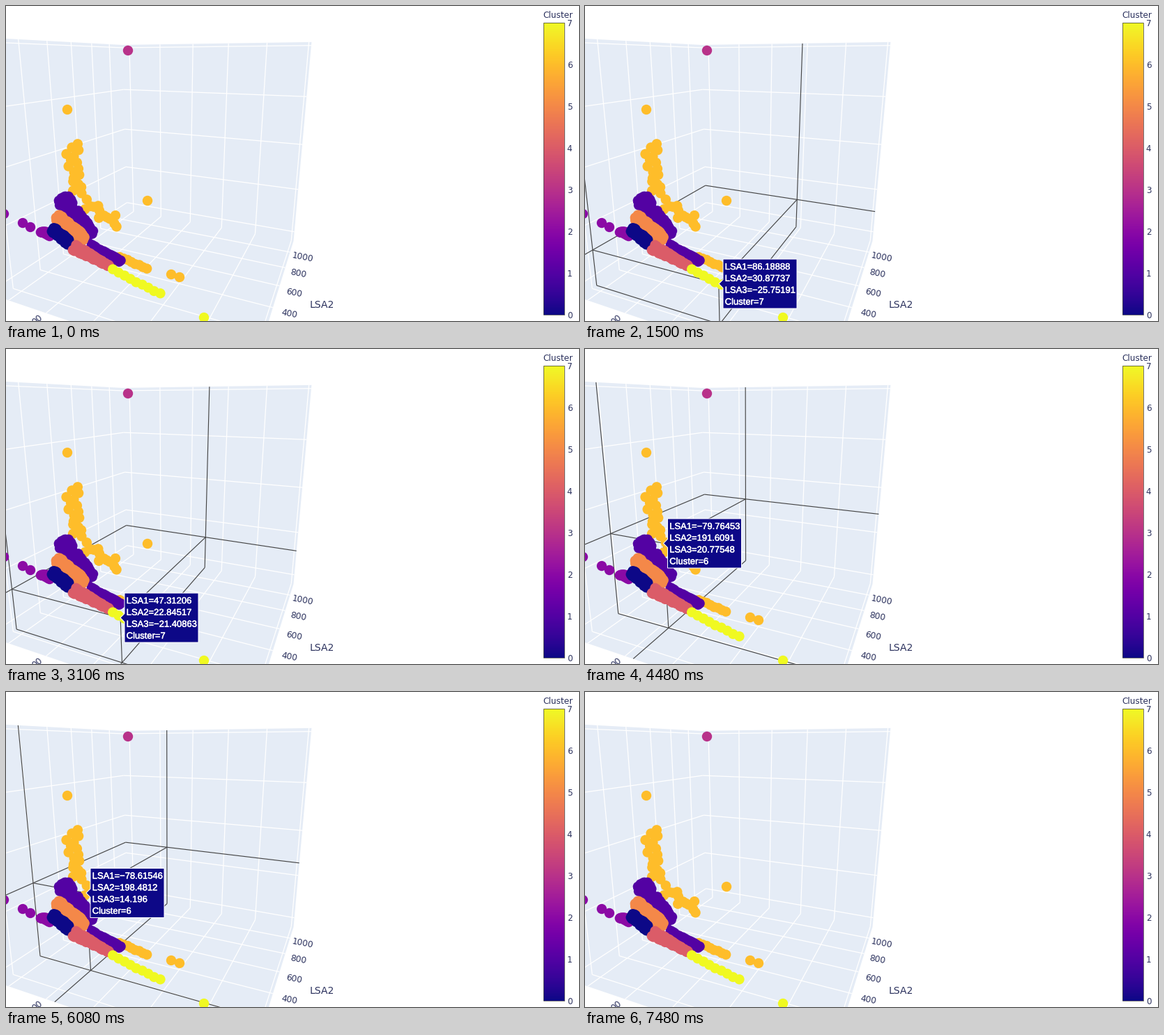
Write a matplotlib script that moves like this. It is 822x453 px and loops after 8 s.

```python
import numpy as np
import matplotlib.pyplot as plt
from matplotlib.animation import FuncAnimation
from matplotlib.collections import LineCollection
from matplotlib.patches import Polygon, Rectangle
from matplotlib.patheffects import withStroke

W, H, DPI = 822, 453, 128
PX = 72 / DPI  # points per pixel
INK = "#2c325e"
plasma = plt.get_cmap("plasma")
rng = np.random.default_rng(4)

fig = plt.figure(figsize=(W / DPI, H / DPI), dpi=DPI, facecolor="white")
ax = fig.add_axes([0, 0, 1, 1])
ax.axis("off")

# Perspective camera, anchored at the far top corner of the data box
LOW = np.array([-224, -85, -61.2])
HIGH = np.array([306, 1166, 153.2])
CORNER = np.array([LOW[0], HIGH[1], HIGH[2]])
ORIGIN = np.array([166.8, 56])
AXES = np.array([(35.85, -2.6), (16.01, 2.39), (-12.83, -127.1)]) / 100
DEPTH = np.array([-0.0351, 0.0324, -0.0549]) / 100
WALLS = (LOW[0], HIGH[1], LOW[2])


def project(point):
    offset = np.asarray(point, float) - CORNER
    return (ORIGIN + offset @ AXES) / (1 + offset @ DEPTH)


def box_line(axis, point):
    """Line along one axis through a point, across the whole box."""
    ends = np.array([point, point], float)
    ends[:, axis] = LOW[axis], HIGH[axis]
    return project(ends[0]), project(ends[1])


def on_wall(axis, point):
    hit = np.array(point, float)
    hit[axis] = WALLS[axis]
    return hit


def wall_lines(axis, value):
    """Lines of one constant coordinate on the two walls that show it."""
    point = np.array(WALLS, float)
    point[axis] = value
    return [box_line(other, point) for other in range(3) if other != axis]


def label(x, y, text, size, **kw):
    kw = {"color": INK, "family": "DejaVu Sans", "ha": "center",
          "va": "center_baseline", **kw}
    return ax.text(x, y, text, fontsize=size * PX, **kw)


# Walls, floor and grid
x0, y0, z0 = LOW
x1, y1, z1 = HIGH
outline = [(x0, y0, z1), (x0, y1, z1), (x1, y1, z1),
           (x1, y1, z0), (x1, y0, z0), (x0, y0, z0)]
pane = Polygon([project(c) for c in outline], facecolor="#E5ECF6", lw=0, zorder=0)
ax.add_patch(pane)
grid = [line for axis, step in enumerate((100, 200, 50))
        for value in np.arange(-200, 1001, step) if LOW[axis] < value < HIGH[axis]
        for line in wall_lines(axis, value)]
ax.add_collection(LineCollection(grid, colors="white", linewidths=1.3 * PX, zorder=1))
spikes = LineCollection([], colors="#444444", linewidths=1.15 * PX, zorder=2)
ax.add_collection(spikes)


# Data points, drawn back to front
def band(a, b, count, start, end=None):
    """Points along a line, scattered sideways by a width that may taper."""
    a, b = np.array(a, float), np.array(b, float)
    t = np.linspace(0, 1, count)
    width = start + ((start if end is None else end) - start) * t
    side = np.array([b[1] - a[1], a[0] - b[0]]) / np.hypot(*(b - a))
    return a + np.outer(t, b - a) + np.outer(width * rng.uniform(-1, 1, count), side)


layers = [
    (3, [(175, 64)]),
    (6, [(88, 149), (203, 280), (237, 386), (249, 390)]),
    (6, band((94, 199), (99, 270), 17, 10)),
    (6, band((112, 285), (161, 313), 13, 9)),
    (6, band((163, 361), (202, 378), 8, 1)),
    (1, band((80, 276), (122, 329), 140, 10, 6)),
    (1, band((122, 345), (164, 367), 40, 2)),
    (2, [(-3, 299), (24, 312), (35, 318)]),
    (2, band((50, 325), (64, 329), 20, 1, 4)),
    (5, band((73, 303), (112, 335), 90, 5)),
    (0, band((67, 321), (91, 341), 60, 4)),
    (4, band((98, 347), (148, 374), 90, 5, 1)),
    (7, band((153, 379), (221, 414), 9, 1)),
    (7, [(284, 448)]),
]
points = np.vstack([spots for _, spots in layers])
shades = np.vstack([[plasma(c / 7)] * len(spots) for c, spots in layers])
ax.scatter(*points.T, s=(14.4 * PX) ** 2, c=shades, linewidths=0, zorder=3)

# Axis labels
for tick in (400, 600, 800, 1000):
    x, y = project((x1, tick, z0))
    far = (1000 - tick) / 600
    label(426 - 20 * far ** 1.05, 361.5 + 81 * far ** 1.15, str(tick), 12.3,
          rotation=-11, va="center")
label(44.5, 451, "00", 12.3, rotation=40, va="center")
label(453, 429, "LSA2", 14)

# Colour bar
ax.imshow(np.linspace(1, 0, 256)[:, None], cmap=plasma, aspect="auto",
          extent=(771, 801, 444, 24), zorder=4)
ax.add_patch(Rectangle((771, 24), 30, 420, fill=False, ec="#444444",
                       lw=PX, alpha=0.75, zorder=5))
label(792, 12, "Cluster", 12)
for i in range(8):
    label(808.5, 444 - 60 * i, str(i), 12)
ax.set_xlim(0, W)
ax.set_ylim(H, 0)

# Hover box
tip = Polygon([(0, 0)] * 3, facecolor=plasma(0), edgecolor="white", lw=PX, zorder=6)
ax.add_patch(tip)
tip_rows = [label(0, 0, "", 13, color="white", family="Liberation Sans",
                  ha="left", va="baseline", zorder=7,
                  path_effects=[withStroke(linewidth=0.4 * PX, foreground="white")])
            for _ in range(4)]

# Start in ms, hovered position, cluster
HOVERS = [
    (500, (111.7682, 41.29835, -29.52941), 7),
    (1500, (86.18888, 30.87737, -25.75191), 7),
    (2500, (47.31206, 22.84517, -21.40863), 7),
    (3500, (-50.09478, 91.36556, 1.763514), 1),
    (4480, (-79.76453, 191.6091, 20.77548), 6),
    (5480, (-78.61546, 198.4812, 14.196), 6),
    (6480, (-79.10382, 194.2067, 14.63352), 6),
]
HOVER_END = 7480
STEP = 20
FRAMES = 8000 // STEP


def show_hover(position, cluster):
    target = project(position)
    lines = [line for axis in range(3) for line in wall_lines(axis, position[axis])]
    lines += [(target, project(on_wall(axis, position))) for axis in range(3)]
    spikes.set_segments(lines)

    x, y = np.round(target * 2) / 2
    near, far, half = x + 6, x + 112, 35.5
    tip.set_xy([(x, y), (near, y - 6), (near, y - half), (far, y - half),
                (far, y + half), (near, y + half), (near, y + 6)])
    texts = [f"LSA{i}={v:.7g}" for i, v in enumerate(position, 1)]
    texts.append(f"Cluster={cluster}")
    for i, (row, text) in enumerate(zip(tip_rows, texts)):
        row.set_text(text.replace("-", "\u2212"))
        row.set_position((x + 8.7, y - 20.5 + 16.8 * i))


def update(frame):
    t = frame * STEP
    visible = HOVERS[0][0] <= t < HOVER_END
    for artist in (spikes, tip, *tip_rows):
        artist.set_visible(visible)
    if visible:
        _, position, cluster = [h for h in HOVERS if h[0] <= t][-1]
        show_hover(position, cluster)
    return [spikes, tip, *tip_rows]


spikes.set_clip_path(pane)
anim = FuncAnimation(fig, update, frames=FRAMES, interval=STEP, repeat=True,
                     repeat_delay=0, blit=False)
plt.show()
```
